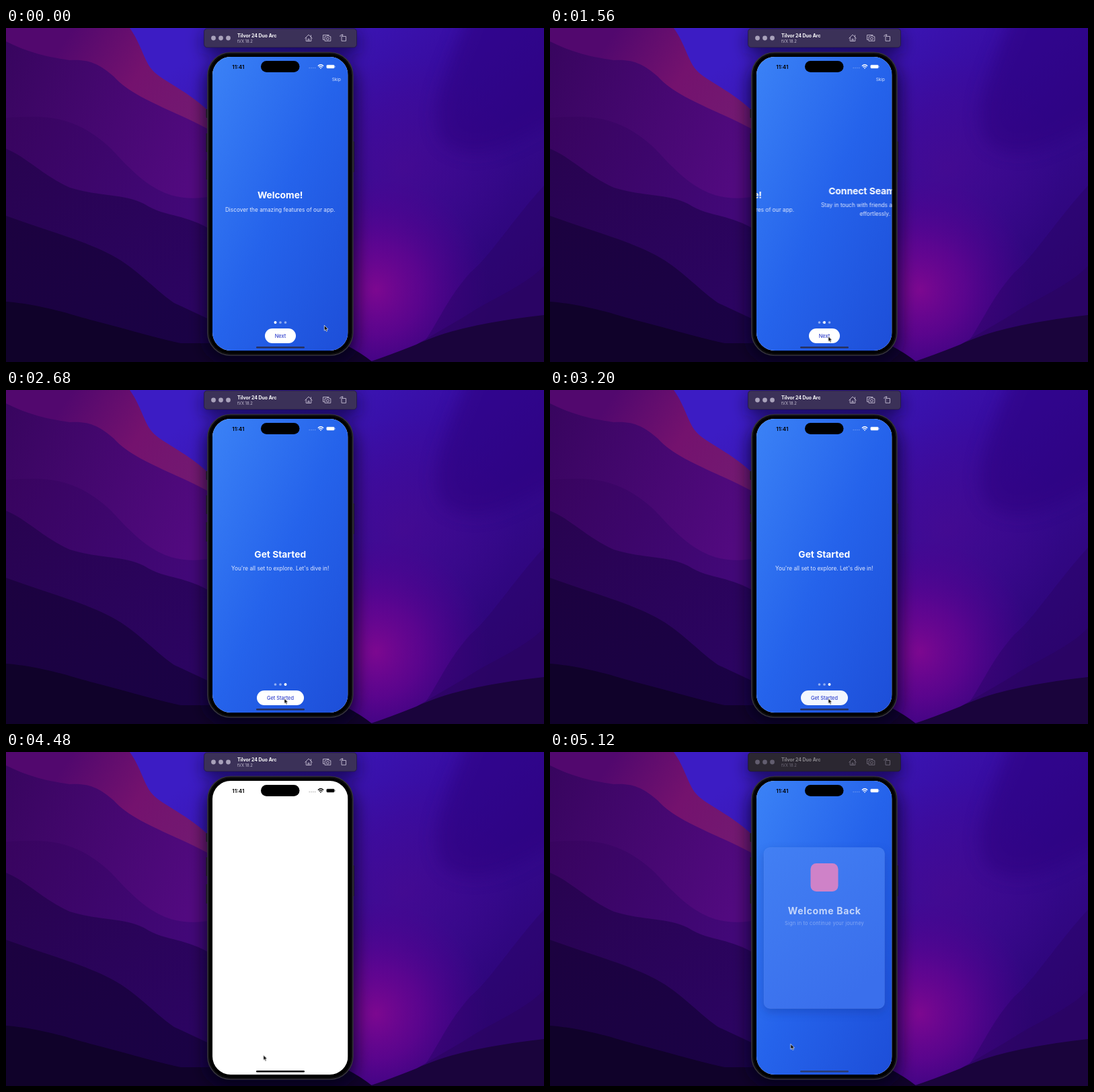
An HTML page for the animation above (5.14 s loop, 800 by 498 pixels).

```html
<!DOCTYPE html>
<html lang="en">
<head>
<meta charset="utf-8">
<title>Onboarding flow</title>
<style>
  html, body { margin: 0; width: 100%; height: 100%; overflow: hidden; background: #1a0440; }
  svg { display: block; width: 800px; height: 498px; font-family: Inter, sans-serif; }
  .mid { text-anchor: middle; }
  .h { font-size: 13.8px; font-weight: 700; fill: #fff; }
  .p { font-size: 8.25px; fill: #e3eafd; }
  .label { font-size: 7.35px; font-weight: 500; fill: #3040cc; }

  /* One shared 5140 ms loop */
  .a { animation: 5140ms linear infinite both; }
  .hard { animation-timing-function: step-end; }

  .cursor { animation-name: cursor; }
  @keyframes cursor {
    0% { transform: translate(473px, 443px); animation-timing-function: ease-in-out; }
    17.5%, 80.7% { transform: translate(413.5px, 459.5px); animation-timing-function: ease-in-out; }
    87.16% { transform: translate(382.5px, 451.5px); animation-timing-function: ease-out; }
    99.6%, 100% { transform: translate(357.5px, 435px); }
  }

  .pages { animation-name: pages; animation-timing-function: ease-in-out; }
  @keyframes pages {
    0%, 26.46% { transform: translateX(0); }
    33.27%, 42.41% { transform: translateX(-202px); }
    49.22%, 100% { transform: translateX(-404px); }
  }
  .lift { animation-name: lift; }
  @keyframes lift { 0% { transform: none; } 45.82%, 100% { transform: translateY(-4.5px); } }
  .dot { animation-name: dot; }
  @keyframes dot {
    0% { transform: translateX(0); }
    29.86% { transform: translateX(7.5px); }
    45.82%, 100% { transform: translateX(15px); }
  }
  .early { animation-name: early; }
  @keyframes early { 0% { visibility: visible; } 45.82%, 100% { visibility: hidden; } }
  .late { animation-name: late; }
  @keyframes late { 0% { visibility: hidden; } 45.82%, 100% { visibility: visible; } }

  .press { animation-name: press; }
  @keyframes press {
    0%, 21.4% { opacity: 1; }
    22.57%, 26.46% { opacity: .95; }
    28.02%, 38.13% { opacity: 1; }
    38.91%, 42.41% { opacity: .95; }
    43.97%, 61.6% { opacity: 1; }
    62.2%, 73% { opacity: .95; }
    76.26% { opacity: .45; }
    78.5%, 100% { opacity: .2; }
  }

  .intro { animation-name: intro; }
  @keyframes intro { 0%, 73.93% { opacity: 1; } 76.26% { opacity: .73; } 82.3%, 100% { opacity: 0; } }
  .login { animation-name: login; }
  @keyframes login { 0%, 89.88% { opacity: 0; } 95.33%, 100% { opacity: 1; } }
  .card { animation-name: card; }
  @keyframes card { 0%, 93.4% { opacity: 0; } 98.5%, 100% { opacity: 1; } }
  .head { animation-name: head; }
  @keyframes head { 0%, 95% { opacity: 0; } 99.61%, 100% { opacity: .7; } }
  .sub { animation-name: sub; }
  @keyframes sub { 0%, 96.5% { opacity: 0; } 99.61%, 100% { opacity: .36; } }

  .icons { animation-name: icons; }
  @keyframes icons { 0% { color: #fff; } 79.8% { color: #000; } 92.6%, 100% { color: #fff; } }
  .home { animation-name: home; }
  @keyframes home { 0% { fill: #26305c; } 75% { fill: #000; } 93%, 100% { fill: #2b3c70; } }
  .bar { animation-name: bar; }
  @keyframes bar { 0% { fill: #3b3158; } 96%, 100% { fill: #2b2731; } }
  .tools { animation-name: tools; }
  @keyframes tools { 0% { opacity: 1; } 96%, 100% { opacity: .45; } }
</style>
</head>
<body>
<svg viewBox="0 0 800 498">
  <defs>
    <linearGradient id="blue" x1="0" y1="0" x2="1" y2="1">
      <stop offset="0" stop-color="#3b82f6"/><stop offset=".5" stop-color="#2563eb"/><stop offset="1" stop-color="#1d4ed8"/>
    </linearGradient>
    <linearGradient id="glass" x1="0" y1="0" x2=".6" y2="1">
      <stop offset="0" stop-color="#427ff3"/><stop offset="1" stop-color="#3a6fec"/>
    </linearGradient>
    <linearGradient id="sky" x1="0" y1="0" x2="1" y2=".8">
      <stop offset=".25" stop-color="#3c1cc4"/><stop offset=".55" stop-color="#380ca0"/><stop offset="1" stop-color="#2c0470"/>
    </linearGradient>
    <linearGradient id="ridge" gradientUnits="userSpaceOnUse" x1="100" y1="0" x2="300" y2="130">
      <stop offset="0" stop-color="#52086e"/><stop offset=".5" stop-color="#74126e"/><stop offset="1" stop-color="#721a72"/>
    </linearGradient>
    <linearGradient id="crest" x1="0" y1="0" x2="1" y2=".4">
      <stop offset="0" stop-color="#38055f"/><stop offset="1" stop-color="#520a80"/>
    </linearGradient>
    <linearGradient id="hill" x1="0" y1="0" x2="1" y2=".3">
      <stop offset="0" stop-color="#38045f"/><stop offset="1" stop-color="#420878"/>
    </linearGradient>
    <linearGradient id="slope" x1="0" y1="0" x2="1" y2="1">
      <stop offset="0" stop-color="#280350"/><stop offset="1" stop-color="#2c0464"/>
    </linearGradient>
    <linearGradient id="low" x1="0" y1="0" x2="1" y2="1">
      <stop offset="0" stop-color="#1c0240"/><stop offset="1" stop-color="#1a0246"/>
    </linearGradient>
    <radialGradient id="glow" gradientUnits="userSpaceOnUse" cx="550" cy="390" r="170">
      <stop offset="0" stop-color="#7c0890"/><stop offset=".4" stop-color="#680492" stop-opacity=".75"/><stop offset="1" stop-color="#500090" stop-opacity="0"/>
    </radialGradient>
    <radialGradient id="haze" gradientUnits="userSpaceOnUse" cx="590" cy="210" r="170">
      <stop offset="0" stop-color="#4c0a90" stop-opacity=".6"/><stop offset="1" stop-color="#4a0a90" stop-opacity="0"/>
    </radialGradient>
    <filter id="soft" x="-20%" y="-20%" width="140%" height="140%"><feGaussianBlur stdDeviation="7"/></filter>
    <filter id="wide" x="-40%" y="-40%" width="180%" height="180%"><feGaussianBlur stdDeviation="12"/></filter>
    <clipPath id="screen"><rect x="307" y="43" width="201.500" height="438" rx="27"/></clipPath>
  </defs>

  <!-- Wallpaper -->
  <rect width="800" height="498" fill="url(#sky)"/>
  <rect x="400" width="400" height="498" fill="url(#haze)"/>
  <path d="M690 -30C660 60 620 120 650 170C700 210 760 170 830 130V-30Z" fill="#2a067c" opacity=".5" filter="url(#wide)"/>
  <rect x="350" y="200" width="450" height="298" fill="url(#glow)"/>
  <path d="M800 235C750 290 720 340 690 365C650 410 640 450 600 498H800Z" fill="#2b0568" opacity=".5"/>
  <path d="M800 355C770 385 730 400 690 425C650 450 610 470 570 498H800Z" fill="#2a0460" opacity=".6"/>
  <path d="M800 428C730 436 660 448 610 472Q570 488 540 498H800Z" fill="#1a043c"/>

  <path d="M0 0H184C200 22 206 50 217 62C232 80 268 90 310 132V330H0Z" fill="url(#ridge)"/>
  <path d="M0 20C40 40 70 44 95 48C125 46 140 55 160 72C190 106 250 122 310 156V340H0Z" fill="url(#crest)"/>
  <path d="M0 134C50 130 90 130 132 160C155 176 165 190 180 205C220 245 255 262 310 250V340H0Z" fill="url(#hill)"/>
  <path d="M0 180C30 192 55 220 95 238C140 252 172 246 205 262C240 284 265 275 310 304V460H0Z" fill="url(#slope)"/>
  <path d="M0 280C60 302 110 315 150 335C190 354 215 385 250 410L310 438V498H0Z" fill="url(#low)"/>
  <path d="M0 408C50 412 90 425 125 435C170 446 220 462 260 470H500Q525 482 545 498H0Z" fill="#10022a"/>

  <!-- Window shadow -->
  <g fill="#06001c" filter="url(#wide)">
    <rect x="297" y="48" width="222" height="450" rx="34" opacity=".75"/>
    <rect x="294" y="6" width="228" height="32" rx="5" opacity=".6"/>
  </g>

  <!-- Simulator toolbar -->
  <rect class="a hard bar" x="294.500" y="1" width="227" height="28" rx="4.500" stroke="#1c1436" stroke-width=".6"/>
  <g class="a hard tools">
    <g fill="#a9a2bb"><circle cx="308.500" cy="15" r="3.400"/><circle cx="319.500" cy="15" r="3.400"/><circle cx="330.500" cy="15" r="3.400"/></g>
    <text x="344" y="14" font-size="6.900" font-weight="700" fill="#fff">Tilvor 24 Duo Arc</text>
    <text x="344" y="21.500" font-size="5.900" fill="#c5bfd3">tVX 18.2</text>
    <g fill="none" stroke="#c4bdd3" stroke-width=".9" stroke-linejoin="round">
      <path d="M444.500 15.500L450 10L455.500 15.500M446.200 14V19.500H453.800V14M449 19.500V16.500H451V19.500M453.500 13V10.500"/>
      <path d="M473.500 17.500H471.500V10.500H480V12M474 12.800H476L477 11.800H480L481 12.800H482.800V19.300H474Z"/><circle cx="478.400" cy="16" r="1.900"/>
      <path d="M499 12.500H505.500V19.300H499ZM497 13V11.500Q497 10.500 498.500 10.500H501M499.500 9L501 10.500L499.500 12"/>
    </g>
  </g>

  <!-- Phone body -->
  <g fill="#1c1a22">
    <rect x="297.500" y="121" width="3" height="13" rx="1"/><rect x="297.500" y="157" width="3" height="28" rx="1"/>
    <rect x="297.500" y="197" width="3" height="29" rx="1"/><rect x="514.800" y="169" width="3" height="46" rx="1"/>
  </g>
  <rect x="300" y="36.500" width="215.800" height="451.500" rx="34" fill="#000" stroke="#34323a" stroke-width="1.700"/>
  <rect x="302" y="38.500" width="211.800" height="447.500" rx="32" fill="none" stroke="#151419"/>

  <!-- Screens -->
  <g clip-path="url(#screen)">
    <rect x="307" y="43" width="201.500" height="438" fill="#fff"/>

    <g class="a intro">
      <rect x="307" y="43" width="201.500" height="438" fill="url(#blue)"/>
      <text class="a hard early" x="484.700" y="78.900" font-size="6.450" fill="#dbe6fd">Skip</text>
      <g class="a hard lift"><g class="a pages mid">
        <text class="h" x="407.700" y="254">Welcome!</text>
        <text class="p" x="407.700" y="273.800">Discover the amazing features of our app.</text>
        <text class="h" x="609.700" y="247.500">Connect Seamlessly</text>
        <text class="p" x="609.700" y="267.400">Stay in touch with friends and colleagues</text>
        <text class="p" x="609.700" y="280.400">effortlessly.</text>
        <text class="h" x="811.700" y="254">Get Started</text>
        <text class="p" x="811.700" y="273.800">You're all set to explore. Let's dive in!</text>
      </g></g>
      <g fill="#fff">
        <g opacity=".5"><circle cx="400.500" cy="439" r="1.850"/><circle cx="408" cy="439" r="1.850"/><circle cx="415.500" cy="439" r="1.850"/></g>
        <circle class="a hard dot" cx="400.500" cy="439" r="1.950"/>
      </g>
      <g class="a press mid">
        <g class="a hard early">
          <rect x="385" y="448" width="46" height="22" rx="11" fill="#fff"/>
          <text class="label" x="408" y="461.800">Next</text>
        </g>
        <g class="a hard late">
          <rect x="373" y="448" width="70" height="22" rx="11" fill="#fff"/>
          <text class="label" x="408" y="461.800">Get Started</text>
        </g>
      </g>
    </g>

    <g class="a login">
      <rect x="307" y="43" width="201.500" height="438" fill="url(#blue)"/>
      <g class="a card">
        <rect x="318" y="148" width="179.500" height="240" rx="9" fill="#123a9c" opacity=".4" filter="url(#soft)"/>
        <rect x="318" y="142.500" width="179.500" height="240" rx="9" fill="url(#glass)" stroke="#fff" stroke-opacity=".1" stroke-width=".6"/>
        <rect x="387.500" y="166" width="41" height="42" rx="8.500" fill="#cf82c8"/>
      </g>
      <g class="mid" fill="#fff">
        <text class="a head" x="408.200" y="242.300" font-size="14" font-weight="700" letter-spacing=".65">Welcome Back</text>
        <text class="a sub" x="408" y="258.300" font-size="7.500" letter-spacing=".17">Sign in to continue your journey</text>
      </g>
    </g>

    <!-- Status bar -->
    <text class="mid" x="345.300" y="60.800" font-size="8.200" font-weight="600">11:41</text>
    <rect x="379" y="49" width="57.500" height="17" rx="8.500"/>
    <g class="a hard icons" fill="currentColor">
      <g opacity=".35"><circle cx="451.200" cy="59.600" r=".75"/><circle cx="454" cy="59.600" r=".75"/><circle cx="456.800" cy="59.600" r=".75"/><circle cx="459.600" cy="59.600" r=".75"/></g>
      <path d="M463.900 56.700Q468 52.900 472.100 56.700M465.500 58.500Q468 56.200 470.500 58.500" fill="none" stroke="currentColor" stroke-width="1.350"/>
      <path d="M466.700 59.700Q468 58.600 469.300 59.700L468 61Z"/>
      <rect x="476.200" y="54.700" width="12.600" height="5.800" rx="1.900" opacity=".4"/>
      <rect x="476.800" y="55.300" width="11.400" height="4.600" rx="1.300"/>
      <rect x="489.200" y="56.700" width=".8" height="1.900" rx=".4" opacity=".5"/>
    </g>
    <rect class="a hard home" x="372" y="475" width="72" height="2.400" rx="1.200"/>
  </g>

  <g class="a cursor">
    <path d="M.3 .3V8.200L2.100 6.600L3.300 9.400L4.700 8.800L3.500 6.100H5.900Z" fill="#000" stroke="#fff" stroke-width=".7" stroke-linejoin="round"/>
  </g>
</svg>
</body>
</html>
```
